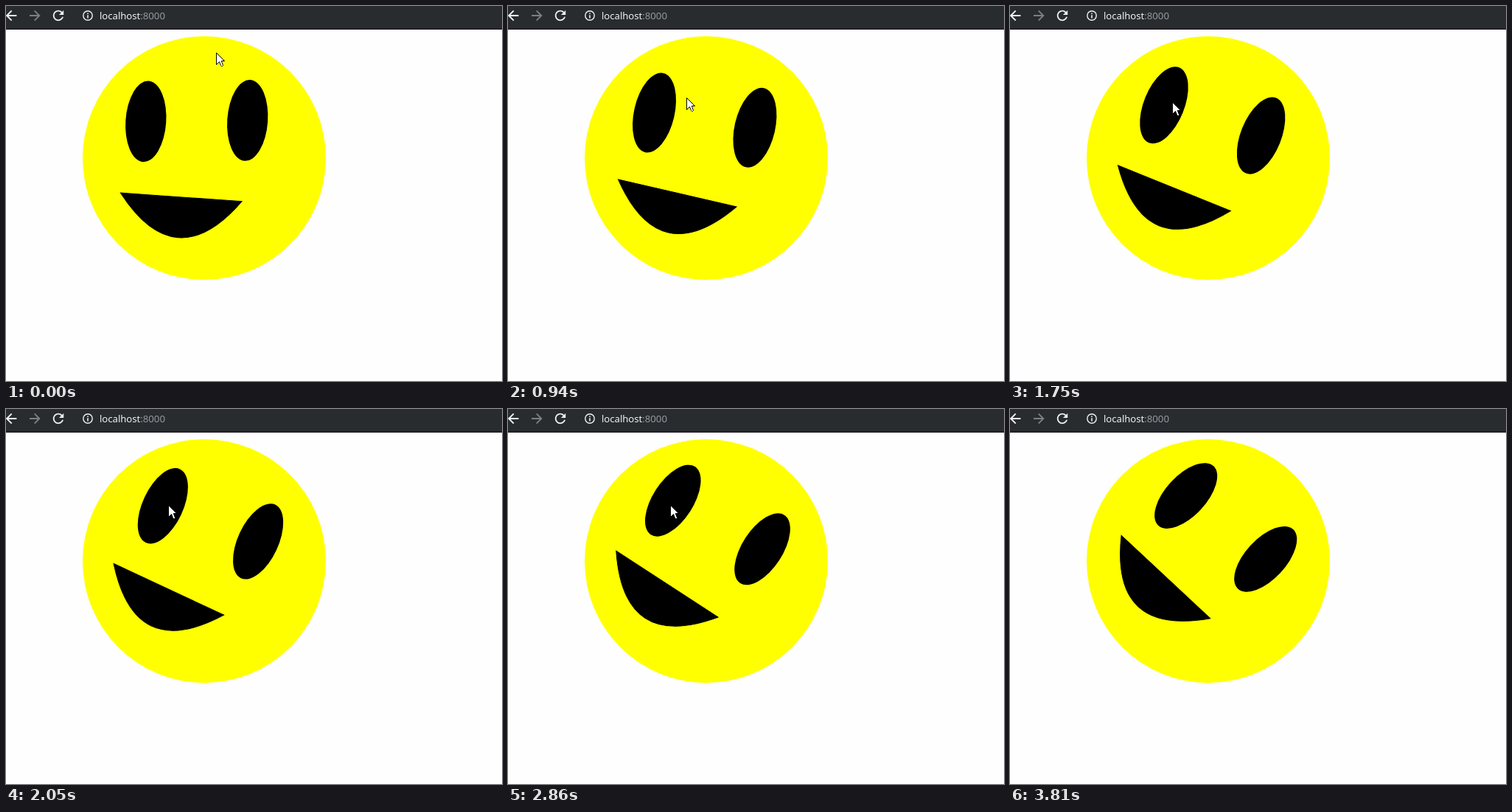
These frames come from a looping animation (673 by 508 pixels, 3910 ms). An HTML page:

```html
<!DOCTYPE html>
<html lang="en">
<head>
<meta charset="utf-8">
<title>Rotating smiley</title>
<style>
  html, body { margin: 0; width: 100%; height: 100%; overflow: hidden; background: #fefefe; }
  svg { display: block; }
  .url { font: 500 13.2px "Open Sans", "Noto Sans", sans-serif; fill: #fff; }
  .port { fill: #9aa0a6; }
  .icon { fill: none; stroke: #f1f1f1; stroke-width: 1.9; }
  .dim { stroke: #7c7f82; }
  .solid { fill: #f1f1f1; }
</style>
</head>
<body>
<svg width="673" height="508" viewBox="0 0 673 508">
  <rect width="673" height="32" fill="#292c2f"/>
  <rect y="30" width="673" height="2" fill="#211f25"/>

  <path class="icon" d="M14.4 13H1.5M7.7 6.4L1.1 13l6.6 6.6"/>
  <path class="icon dim" d="M32 13H45M38.7 6.4L45.3 13l-6.6 6.6"/>
  <path class="solid" transform="translate(60.2 2.2) scale(.9)" d="M17.65 6.35C16.2 4.9 14.21 4 12 4c-4.42 0-7.99 3.58-7.99 8s3.57 8 7.99 8c3.73 0 6.84-2.55 7.73-6h-2.08c-.82 2.33-3.04 4-5.65 4-3.31 0-6-2.69-6-6s2.69-6 6-6c1.66 0 3.14.69 4.22 1.78L13 11h7V4z"/>
  <circle class="icon" cx="111" cy="13" r="6.2" style="stroke-width:1.4"/>
  <path class="solid" d="M110.2 9.4h1.6v1.6h-1.6zM110.2 12.2h1.6v4.4h-1.6z"/>
  <text class="url" x="127" y="18">localhost<tspan class="port">:8000</tspan></text>

  <circle cx="269" cy="206" r="165" fill="#ff0"/>
  <g id="face">
    <ellipse cx="-82.5" cy="-44" rx="27.5" ry="55"/>
    <ellipse cx="55" cy="-55" rx="27.5" ry="55"/>
    <path d="M-110 55Q-27.5 165 55 55Z" stroke="#000"/>
  </g>
  <path id="cursor" d="M.5 .5V16.5L4.5 12.5 6.5 17.5 7.5 18.5H8.5L9.5 17.5 7.3 11.5H11.5Z"
    fill="#fff" stroke="#000" stroke-linejoin="round"/>
</svg>
<script>
  const LOOP = 3910, STEP = 136, LEAD = 25;
  const EXIT_STEP = 22;

  // Pointer stops: step, x, y.
  const stops = [[1, 285, 63], [3, 280, 78], [7, 242, 124], [10, 220, 130]];
  const exit = [477, 400];

  const face = document.getElementById('face');
  const cursor = document.getElementById('cursor');

  // The face turns by whole degrees.
  const angleAt = step => Math.floor(4.05 + 1.415 * step);

  function pointerAt(step) {
    if (step === EXIT_STEP) return exit;
    const next = stops.findIndex(s => s[0] > step);
    if (next < 0) return stops[stops.length - 1].slice(1);
    if (next === 0) return stops[0].slice(1);
    const [from, to] = [stops[next - 1], stops[next]];
    const k = (step - from[0]) / (to[0] - from[0]);
    return [1, 2].map(n => Math.round(from[n] + (to[n] - from[n]) * k));
  }

  function draw(time) {
    const step = Math.floor((time % LOOP + LEAD) / STEP);
    face.setAttribute('transform', `translate(269 206) rotate(${angleAt(step)})`);
    cursor.setAttribute('transform', `translate(${pointerAt(step)})`);
    cursor.style.display = step > EXIT_STEP ? 'none' : '';
  }

  const start = performance.now();
  function frame() {
    draw(performance.now() - start);
    requestAnimationFrame(frame);
  }
  frame();
</script>
</body>
</html>
```
